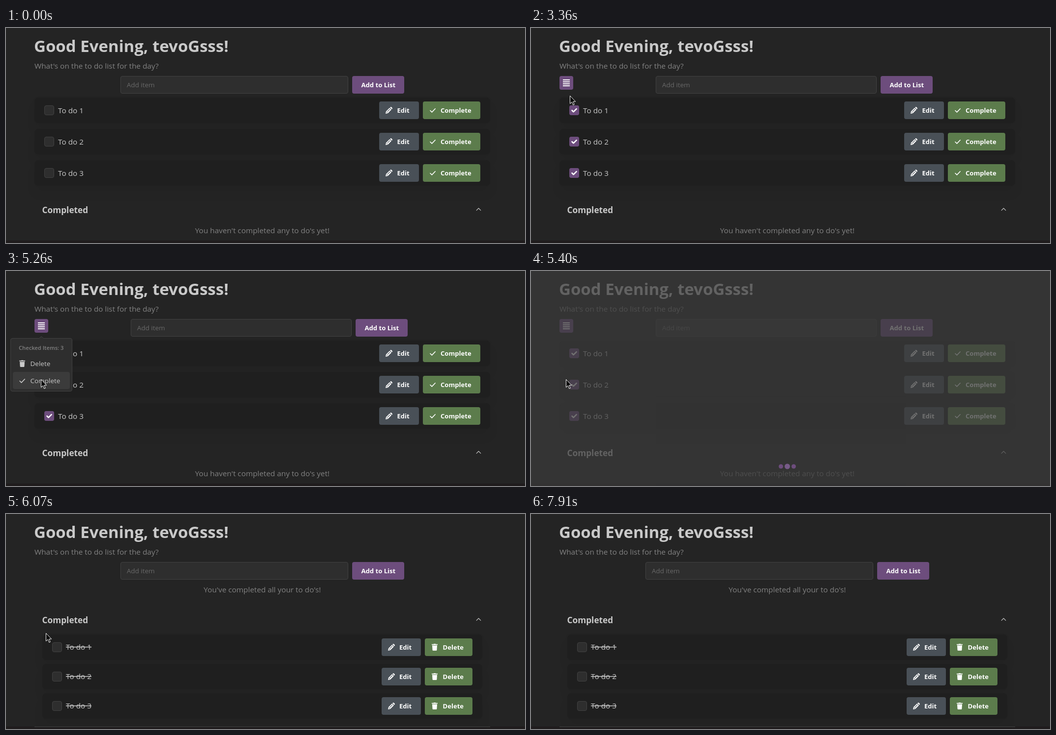
Recreate the animation shown at these times as an HTML page. Size 1057 px wide and 439 px high, loop 8000 ms.

```html
<!DOCTYPE html>
<html lang="en">
<head>
<meta charset="utf-8">
<title>To do list</title>
<style>
  html, body { margin: 0; width: 100%; height: 100%; overflow: hidden; background: #242424; }
  svg { display: block; }
  text { font: 15.35px "Open Sans", "Noto Sans", sans-serif; fill: #c9c9c9; }
  .title { font-size: 33px; font-weight: 700; }
  .heading { font-size: 17.3px; font-weight: 700; }
  .dim { fill: #828282; }
  .mid { text-anchor: middle; }
  .btn { font-size: 13.1px; font-weight: 700; fill: #fff; }
  .small { font-size: 13.5px; }
  .hint { font-size: 13.5px; fill: #696969; }
  .label { font-size: 11.2px; font-weight: 600; fill: #828282; }
  .done { text-decoration: line-through; }
  .card { fill: #1f1f1f; filter: drop-shadow(0 1px 2px rgba(0, 0, 0, .05)) drop-shadow(0 17px 9px rgba(0, 0, 0, .04)); }
  .field { fill: #2e2e2e; stroke: #424242; }
  .purple { fill: #6d4d7d; }
  .slate { fill: #495057; }
  .green { fill: #5c7c4c; }
  .line { fill: none; stroke-linecap: round; stroke-linejoin: round; }

  /* One 8 s timeline shared by every part: 1% = 80 ms */
  .anim { animation: 8s linear infinite; }
  .before { animation-name: before; animation-timing-function: step-end; }
  .picked { animation-name: picked; animation-timing-function: step-end; }
  .todo { animation-name: todo; animation-timing-function: step-end; }
  .finished { animation-name: finished; animation-timing-function: step-end; }
  .tick1 { animation-name: tick1; }
  .tick2 { animation-name: tick2; }
  .tick3 { animation-name: tick3; }
  .menu { animation-name: menu; }
  .hover1 { animation-name: hover1; animation-timing-function: step-end; }
  .hover2 { animation-name: hover2; animation-timing-function: step-end; }
  .overlay { animation-name: overlay; }
  .cursor { animation-name: cursor; }

  @keyframes before { 0% { opacity: 1 } 14.75% { opacity: 0 } 68.375%, 100% { opacity: 1 } }
  @keyframes picked { 0% { opacity: 0 } 14.75% { opacity: 1 } 68.375%, 100% { opacity: 0 } }
  @keyframes todo { 0% { opacity: 1 } 68.375%, 100% { opacity: 0 } }
  @keyframes finished { 0% { opacity: 0 } 68.375%, 100% { opacity: 1 } }
  @keyframes tick1 { 0%, 14.75% { opacity: 0 } 15.8%, 100% { opacity: 1 } }
  @keyframes tick2 { 0%, 25.625% { opacity: 0 } 26.6%, 100% { opacity: 1 } }
  @keyframes tick3 { 0%, 32.5% { opacity: 0 } 33.6%, 100% { opacity: 1 } }
  @keyframes menu { 0%, 44.5% { opacity: 0 } 46.25%, 66.4% { opacity: 1 } 67.4%, 100% { opacity: 0 } }
  @keyframes hover1 { 0% { opacity: 0 } 56.375% { opacity: 1 } 58.7%, 100% { opacity: 0 } }
  @keyframes hover2 { 0% { opacity: 0 } 58.7%, 100% { opacity: 1 } }
  @keyframes overlay { 0%, 66.5% { opacity: 0 } 67.4%, 68.3% { opacity: 1 } 69.25%, 100% { opacity: 0 } }
  @keyframes cursor {
    0%, 6.125% { transform: translate(-16px, 215px) }
    7.125% { transform: translate(3px, 214px) }
    12.5% { transform: translate(80px, 180px) }
    13.875%, 15.625% { transform: translate(84px, 165px) }
    16.5% { transform: translate(83px, 164px) }
    21.625%, 22.4% { transform: translate(90px, 220px) }
    23.375% { transform: translate(84px, 225px) }
    25.75% { transform: translate(82px, 224px) }
    26.625%, 28.375% { transform: translate(73px, 236px) }
    31% { transform: translate(82px, 286px) }
    32%, 36.125% { transform: translate(84px, 292px) }
    42%, 42.8% { transform: translate(79px, 138px) }
    44%, 52.125% { transform: translate(72px, 117px) }
    56% { transform: translate(70px, 165px) }
    57.5% { transform: translate(68px, 190px) }
    59.875%, 61.25% { transform: translate(66px, 223px) }
    61.75%, 71.25% { transform: translate(71px, 221px) }
    72.5% { transform: translate(67px, 210px) }
    75.875%, 77.4% { transform: translate(81px, 243px) }
    79.375% { transform: translate(98px, 280px) }
    81.75% { transform: translate(84px, 240px) }
    82.625% { transform: translate(75px, 230px) }
    84.375% { transform: translate(82px, 197px) }
    86.875% { transform: translate(118px, 250px) }
    90% { transform: translate(297px, 330px) }
    92%, 95% { transform: translate(296px, 261px) }
    98% { transform: translate(347px, 364px) }
    98.8%, 100% { transform: translate(370px, 450px) }
  }
</style>
</head>
<body>
<svg width="1057" height="439" viewBox="0 0 1057 439">
  <defs>
    <rect id="box" class="field" x=".5" y=".5" width="19" height="19" rx="3.5"/>
    <g id="tick">
      <rect class="purple" width="20" height="20" rx="4"/>
      <path class="line" d="M5.5 10.2 8.6 13.2 14.6 7.2" stroke="#fff" stroke-width="2.6"/>
    </g>
    <g id="pencil">
      <path d="M-7 7-5.9 2.2 1.2-4.9 4.9-1.2-2.2 5.9Z" fill="#fff"/>
      <path d="M2.1-5.8 3-6.6Q4-7.4 5-6.5L6.5-5Q7.4-4 6.6-3L5.8-2.1Z" fill="#fff"/>
      <path d="M-3 2.7 2-2.3M-4.8 3.3-3.3 4.8" stroke="#495057" stroke-width="1.2" fill="none"/>
    </g>
    <path id="check" class="line" d="M-5 .5-1.6 3.9 5.2-3.2" stroke-width="1.6"/>
    <path id="trash" d="M-6-6.2H-2.4L-1.7-7H1.7L2.4-6.2H6V-4.4H-6ZM-5-3.5H5L4.4 5.8Q4.3 7 3.1 7H-3.1Q-4.3 7-4.4 5.8Z"/>
    <path id="chevron" class="line" d="M958.2 372.4 962.5 368 966.8 372.4" stroke="#c9c9c9" stroke-width="1.1"/>

    <g id="add">
      <rect class="purple" width="106" height="36" rx="4"/>
      <text class="btn" x="18.5" y="23">Add to List</text>
    </g>
    <g id="row">
      <rect class="card" x="58" width="928" height="52" rx="8"/>
      <use href="#box" x="78" y="16"/>
      <rect class="slate" x="760" y="8" width="81" height="36" rx="4"/>
      <use href="#pencil" x="780" y="26"/>
      <text class="btn" x="796.5" y="31">Edit</text>
      <rect class="green" x="849" y="8" width="117" height="36" rx="4"/>
      <use href="#check" x="869" y="26" stroke="#fff"/>
      <text class="btn" x="885" y="31">Complete</text>
    </g>
    <g id="doneRow">
      <rect class="card" x="74" width="896" height="52" rx="8"/>
      <use href="#box" x="94" y="16"/>
      <rect class="slate" x="765" y="8" width="80" height="36" rx="4"/>
      <use href="#pencil" x="785" y="26"/>
      <text class="btn" x="801" y="31">Edit</text>
      <rect class="green" x="853" y="8" width="97" height="36" rx="4"/>
      <use href="#trash" x="873" y="26" fill="#fff"/>
      <text class="btn" x="889.5" y="31">Delete</text>
    </g>
  </defs>

  <rect width="1057" height="439" fill="#242424"/>
  <rect y="434" width="1057" height="5" fill="#1f1c1d"/>
  <text class="title" x="57" y="49">Good Evening, tevoGsss!</text>
  <text class="dim" x="58" y="83">What's on the to do list for the day?</text>

  <g class="anim before">
    <rect class="field" x="233.5" y="98.5" width="463" height="35" rx="3.5"/>
    <text class="hint" x="246" y="121">Add item</text>
    <use href="#add" x="705" y="98"/>
  </g>

  <g class="anim picked">
    <rect class="purple" x="58" y="98" width="28" height="28" rx="4"/>
    <path d="M65 106h14M65 110h14M65 114h14M65 118h14" stroke="#fff" stroke-width="2"/>
    <rect class="field" x="254.5" y="98.5" width="449" height="35" rx="3.5"/>
    <text class="hint" x="267" y="121">Add item</text>
    <use href="#add" x="712" y="98"/>
  </g>

  <g class="anim todo">
    <use href="#row" y="142"/>
    <use href="#row" y="206"/>
    <use href="#row" y="270"/>
    <text x="106" y="174">To do 1</text>
    <text x="106" y="238">To do 2</text>
    <text x="106" y="302">To do 3</text>
    <use class="anim tick1" href="#tick" x="78" y="158"/>
    <use class="anim tick2" href="#tick" x="78" y="222"/>
    <use class="anim tick3" href="#tick" x="78" y="286"/>
    <text class="heading" x="73.5" y="378">Completed</text>
    <use href="#chevron"/>
    <text class="dim mid" x="522" y="419">You haven't completed any to do's yet!</text>
  </g>

  <g class="anim finished">
    <text class="dim mid" x="522" y="160">You've completed all your to do's!</text>
    <text class="heading" x="73.5" y="223">Completed</text>
    <use href="#chevron" y="-155"/>
    <use href="#doneRow" y="246"/>
    <use href="#doneRow" y="306"/>
    <use href="#doneRow" y="366"/>
    <text class="done" x="122" y="277">To do 1</text>
    <text class="done" x="122" y="337">To do 2</text>
    <text class="done" x="122" y="397">To do 3</text>
    <rect x="58" y="434" width="928" height="1" fill="#424242"/>
  </g>

  <g class="anim menu">
    <rect class="field" x="9.5" y="137.5" width="125" height="108" rx="3.5"/>
    <path class="field" d="M67.5 137.5 72 133.5 76.5 137.5"/>
    <rect x="68" y="137" width="8" height="2" fill="#2e2e2e"/>
    <rect class="anim hover1" x="14" y="171" width="116" height="35" rx="4" fill="#3b3b3b"/>
    <rect class="anim hover2" x="14" y="206" width="116" height="35" rx="4" fill="#3b3b3b"/>
    <text class="label" x="26" y="161">Checked Items: 3</text>
    <use href="#trash" x="33" y="189" fill="#c9c9c9"/>
    <text class="small" x="49.5" y="194">Delete</text>
    <use href="#check" x="33" y="224" stroke="#c9c9c9"/>
    <text class="small" x="49.5" y="229">Complete</text>
  </g>

  <g class="anim overlay">
    <rect width="1057" height="439" fill="#3b3b3b" fill-opacity=".72"/>
    <circle class="purple" cx="509" cy="399" r="4.5"/>
    <circle cx="522" cy="399" r="5.5" fill="#775b88"/>
    <circle class="purple" cx="535" cy="399" r="4.5"/>
  </g>

  <path class="anim cursor" d="M.5.5V16.5L4.2 13.1 6.8 19.2 9.2 18.2 6.7 12.2H11.6Z" fill="#000" stroke="#fff"/>
</svg>
</body>
</html>
```
